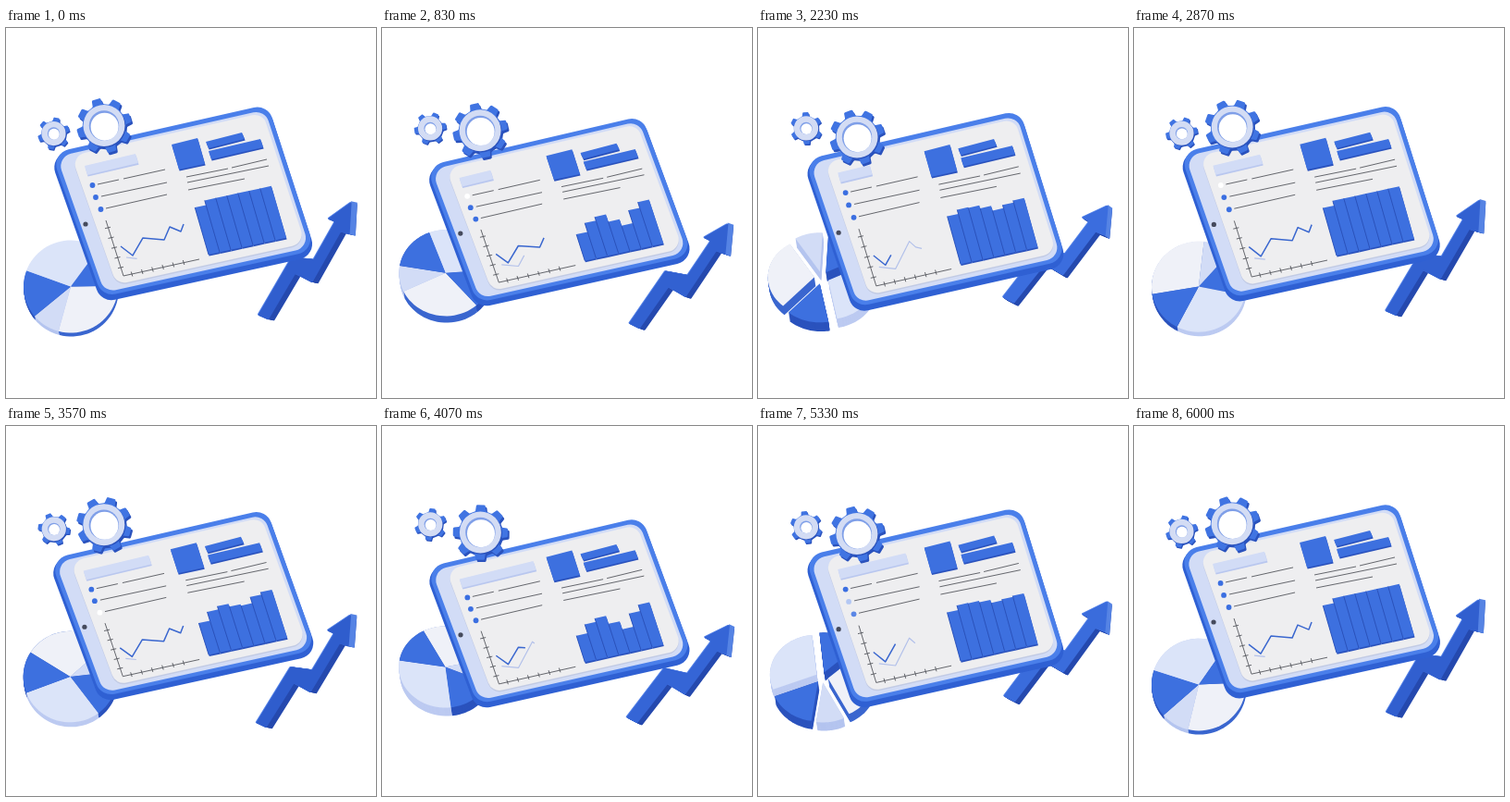
Animation of 400 by 400 pixels, one loop 6.03 s. Source, as an HTML page with a canvas:

```html
<!DOCTYPE html>
<html lang="en">
<head>
<meta charset="utf-8">
<title>Analytics tablet</title>
<style>
  html, body { margin: 0; width: 100%; height: 100%; overflow: hidden; background: #fff; }
  canvas { display: block; width: 400px; height: 400px; }
</style>
</head>
<body>
<canvas id="stage"></canvas>
<script>
const LOOP = 6030, SWAY = LOOP / 2, TAU = Math.PI * 2;
const BLUE = '#3d70df', DARK = '#2a52bd', LIGHT = '#d2dcf6', WHITE = '#eff1f8', INK = '#55575e';
const canvas = document.getElementById('stage');
const ratio = window.devicePixelRatio || 1;
canvas.width = canvas.height = 400 * ratio;
const g = canvas.getContext('2d');
g.scale(ratio, ratio);

let cos, sin, turn, time;

const clamp = x => Math.max(0, Math.min(1, x));
const ease = x => (x = clamp(x)) * x * (3 - 2 * x);
const wave = (c, a, b) => c + a * cos + b * sin;
const shift = (pts, dx, dy) => pts.map(([x, y]) => [x + dx, y + dy]);
const mix = (p, q, k) => p.map((v, i) => v + (q[i] - v) * k);

function poly(pts, fill) {
  g.beginPath();
  pts.forEach(p => g.lineTo(...p));
  g.closePath();
  g.fillStyle = fill;
  g.fill();
}

function roundPoly(pts, r, fill) {
  const n = pts.length;
  g.beginPath();
  g.moveTo(...mix(pts[n - 1], pts[0], 0.5));
  pts.forEach((p, i) => g.arcTo(...p, ...pts[(i + 1) % n], r));
  g.closePath();
  g.fillStyle = fill;
  g.fill();
}

function line(pts, color, width) {
  g.beginPath();
  pts.forEach(p => g.lineTo(...p));
  g.strokeStyle = color;
  g.lineWidth = width;
  g.stroke();
}

function disc(x, y, r, fill) {
  g.beginPath();
  g.arc(x, y, r, 0, TAU);
  g.fillStyle = fill;
  g.fill();
}

// First part of a polyline, by share of its length
function trim(pts, share) {
  const lens = pts.slice(1).map((p, i) => Math.hypot(p[0] - pts[i][0], p[1] - pts[i][1]));
  let left = share * lens.reduce((a, b) => a + b);
  const out = [pts[0]];
  for (let i = 0; i < lens.length && left > 0; i++) {
    out.push(mix(pts[i], pts[i + 1], Math.min(1, left / lens[i])));
    left -= lens[i];
  }
  return out;
}

// Tablet corners: rest place, then cosine and sine parts of the sway
const CORNERS = [
  { p: [46, 136], a: [0, -9.5], b: [-1.5, 3] },
  { p: [283, 82.5], a: [1, -8.5], b: [-1, 2.7] },
  { p: [336, 246], a: [-0.5, -7], b: [1.5, -3] },
  { p: [103, 297], a: [0, -8], b: [-1, -3] }
];

const bilinear = (q, u, v) => mix(mix(q[0], q[1], u), mix(q[3], q[2], u), v);

// Moves a point drawn on the resting tablet to its present place
function warp([x, y]) {
  const dx = x - 47, dy = y - 138, det = 236 * 155 + 55 * 55;
  const u = (dx * 155 - dy * 55) / det, v = (236 * dy + 55 * dx) / det;
  const moves = CORNERS.map(c => c.a.map((a, i) => a * (cos - 1) + c.b[i] * sin));
  const d = bilinear(moves, u, v);
  return [x + d[0], y + d[1]];
}

const quad = (u0, v0, u1, v1) => [[u0, v0], [u1, v0], [u1, v1], [u0, v1]]
  .map(([u, v]) => warp(bilinear(CORNERS.map(c => c.p), u, v)));

function block(pts, fill = BLUE, side = DARK) {
  const q = pts.map(warp);
  poly(shift(q, 0.6, 1.6), side);
  poly(q, fill);
}

const rule = (...pts) => line(pts.map(warp), INK, 0.9);

function drawChart() {
  rule([108, 208], [127, 268], [209, 250]);
  for (let i = 0; i < 5; i++) {
    const [x, y] = mix([110, 216], [124, 259], i / 4);
    rule([x - 3, y + 0.7], [x + 3, y - 0.7]);
  }
  for (let i = 0; i < 6; i++) {
    const [x, y] = mix([136, 266], [192, 253.5], i / 5);
    rule([x - 0.7, y - 2.5], [x + 0.8, y + 2.5]);
  }
  const lag = 25 * TAU / 360;
  const shown = clamp(0.58 + 0.6 * (cos * Math.cos(lag) + sin * Math.sin(lag)));
  const rest = [[130, 248], [148, 250], [163, 221], [170, 227], [188, 231], [197, 224]];
  const main = [[124, 236], [137, 246], [148, 227], [171, 229], [177, 215], [189, 220], [192, 212]];
  g.lineJoin = 'round';
  line(trim(rest.map(warp), 1 - 0.87 * shown), '#b3c1ea', 1.2);
  line(trim(main.map(warp), shown), '#3a67cf', 1.5);
}

function drawBars() {
  const low = [30, 40, 44, 35, 26, 41, 48];
  const t = time % SWAY;
  low.forEach((h, i) => {
    const down = ease((t - 100 - 40 * i) / 700) - ease((t - 1600 - 50 * i) / 700);
    const full = i ? 56 : 51;
    const up = full + (h - full) * down;
    const x = 219 + 12 * i, y = 245 - 2.6 * i, lean = -up * 0.29;
    block([[x, y], [x + lean, y - up], [x + 12 + lean, y - 2.6 - up], [x + 12, y - 2.6]]);
    line([[x, y], [x + lean, y - up]].map(warp), '#2950b8', 0.9);
  });
}

function drawTablet() {
  roundPoly(quad(0, 0.015, 1, 1), 17, '#2f60d3');
  roundPoly(quad(0.012, 0, 1, 0.965), 17, '#4a7fea');
  roundPoly(quad(0.03, 0.03, 0.98, 0.94), 14, LIGHT);
  roundPoly(shift(quad(0.093, 0.045, 0.967, 0.908), 0, 1.5), 13, '#c2cbe4');
  roundPoly(quad(0.093, 0.045, 0.967, 0.908), 13, '#eeeef0');

  disc(...warp([86, 212]), 2.6, '#454a5c');

  const w = 55 - 28 * Math.sin(turn);
  block([[85, 149], [85 + w, 149 - w * 0.235], [88 + w, 159 - w * 0.235], [88, 159]], LIGHT, '#b9c7ef');

  block([[179, 126], [207, 119], [215, 147], [187, 153]]);
  block([[216, 123], [255, 113], [258, 120], [219, 130]]);
  block([[219, 133], [275, 120], [278, 129], [222, 142]]);

  rule([99, 169], [122, 164]);
  rule([127, 163], [172, 153]);
  rule([103, 182], [174, 167]);
  rule([108, 195], [174, 180]);
  rule([195, 161], [240, 152]);
  rule([244, 151], [282, 142]);
  rule([196, 167], [284, 149]);
  rule([197, 175], [258, 163]);

  [[93.5, 170], [97, 183], [102.5, 196]].forEach((p, i) => {
    const gap = Math.abs(time % (LOOP / 3) - 850 - 320 * i);
    const k = ease((210 - gap) / 120);
    const [r, gr, b] = mix([59, 111, 225], [255, 255, 255], k);
    disc(...warp(p), 2.9, `rgb(${r},${gr},${b})`);
  });

  drawChart();
  drawBars();
}

function drawGear(x, y, r, teeth, angle, hole) {
  const pts = [];
  for (let i = 0; i < teeth; i++) {
    [[-0.25, 0.78], [-0.16, 1], [0.16, 1], [0.25, 0.78]].forEach(([da, k]) => {
      const a = angle + i * TAU / teeth + da * (teeth < 8 ? 1.1 : 1);
      pts.push([x + r * k * Math.sin(a), y - r * k * Math.cos(a)]);
    });
  }
  const depth = r * 0.08;
  roundPoly(shift(pts, depth * 0.7, depth), r * 0.05, DARK);
  roundPoly(pts, r * 0.05, '#4074e2');
  disc(x + depth * 0.4, y + depth * 0.5, r * 0.75, DARK);
  disc(x, y, r * 0.75, '#d3dcf4');
  disc(x, y, r * hole, '#7f9fe8');
  disc(x + r * 0.02, y + r * 0.04, r * (hole - 0.04), '#fff');
}

// Slices: start and end in degrees clockwise from the top, face and side colours
const SLICES = [
  [89, 195, WHITE, '#3a66cf'],
  [195, 230, LIGHT, '#b4c4ef'],
  [230, 290, BLUE, DARK],
  [290, 396, '#dbe4f9', '#bccaf1'],
  [36, 89, BLUE, DARK]
];

function burst(from, to) {
  const k = (time - from) / (to - from);
  return k > 0 && k < 1 ? Math.sin(k * Math.PI) ** 2 : 0;
}

function drawPie() {
  const cx = wave(69, 1, 0), cy = wave(268.5, 11, -2);
  const rx = wave(50.5, 0.5, 0), ry = wave(45, 5, 2.5);
  const depth = wave(8, -4, -1.5);
  const apart = 9 * (burst(1680, 2580) + burst(5040, 5920));
  const parts = SLICES.map(([from, to, face, side]) => {
    const a = from * TAU / 360 + turn, b = to * TAU / 360 + turn, m = (a + b) / 2;
    const ox = cx + apart * Math.sin(m), oy = cy - apart * Math.cos(m) * ry / rx;
    const pts = [[ox, oy]];
    for (let i = 0; i <= 24; i++) {
      const s = a + (b - a) * i / 24;
      pts.push([ox + rx * Math.sin(s), oy - ry * Math.cos(s)]);
    }
    return { pts, face, side, oy };
  }).sort((p, q) => p.oy - q.oy);
  for (let d = depth; d > 0; d--) {
    parts.forEach(p => poly(shift(p.pts, d * 0.15, d), p.side));
  }
  parts.forEach(p => poly(p.pts, p.face));
}

// Arrow outline in its middle pose; tip, foot and barb lead the rest
const ARROW = [[376, 200], [348, 215], [356, 219], [331, 255], [306, 250], [266, 306],
  [278, 312], [310, 268], [329, 279], [363, 230], [373, 234]];

function drawArrow() {
  const tip = [wave(0, -3, -2.5), wave(0, -13, 9)];
  const foot = [wave(0, 6, 1.5), wave(0, 4.5, 14.5)];
  const barb = [wave(0, -2, -2.5), wave(0, -11, 9.5)];
  const det = -116 * 35.5 + 3.5 * 106.5;
  const pts = ARROW.map(([x, y]) => {
    const dx = x - 382, dy = y - 199.5;
    const s = (dx * 35.5 + dy * 3.5) / det, r = (-116 * dy - 106.5 * dx) / det;
    return [x, y].map((v, i) => v - 0.5 + tip[i] * (1 - s - r) + foot[i] * s + barb[i] * r);
  });
  const side = [wave(6, 1, 0.7), wave(2.8, -1.2, -0.8)];
  for (let d = 8; d > 0; d--) {
    roundPoly(shift(pts, side[0] * d / 8, side[1] * d / 8), 1, '#2549ae');
  }
  const edge = [pts[0], pts[10]];
  poly([...edge, ...shift(edge, ...side).reverse()], '#5583e4');
  const k = clamp(wave(0.5, -0.35, -0.3));
  const [r, gr, b] = mix([46, 91, 203], [62, 113, 226], k);
  roundPoly(pts, 1, '#5584ea');
  roundPoly(shift(pts, 0.8, 0.5), 1, `rgb(${r},${gr},${b})`);
}

function draw(now) {
  time = now % LOOP;
  turn = time / LOOP * TAU;
  cos = Math.cos(turn * 2);
  sin = Math.sin(turn * 2);
  g.fillStyle = '#fff';
  g.fillRect(0, 0, 400, 400);
  drawPie();
  drawArrow();
  drawTablet();
  drawGear(wave(52, -0.5, 0), wave(109, 5, 0.3), 17.5, 6, 0.19 - turn, 0.38);
  drawGear(wave(106.5, -0.5, -0.5), wave(113.5, -8, -4), 30, 8, turn - 0.3, 0.54);
}

const start = performance.now();
function tick() {
  draw(performance.now() - start);
  requestAnimationFrame(tick);
}
tick();
</script>
</body>
</html>
```
